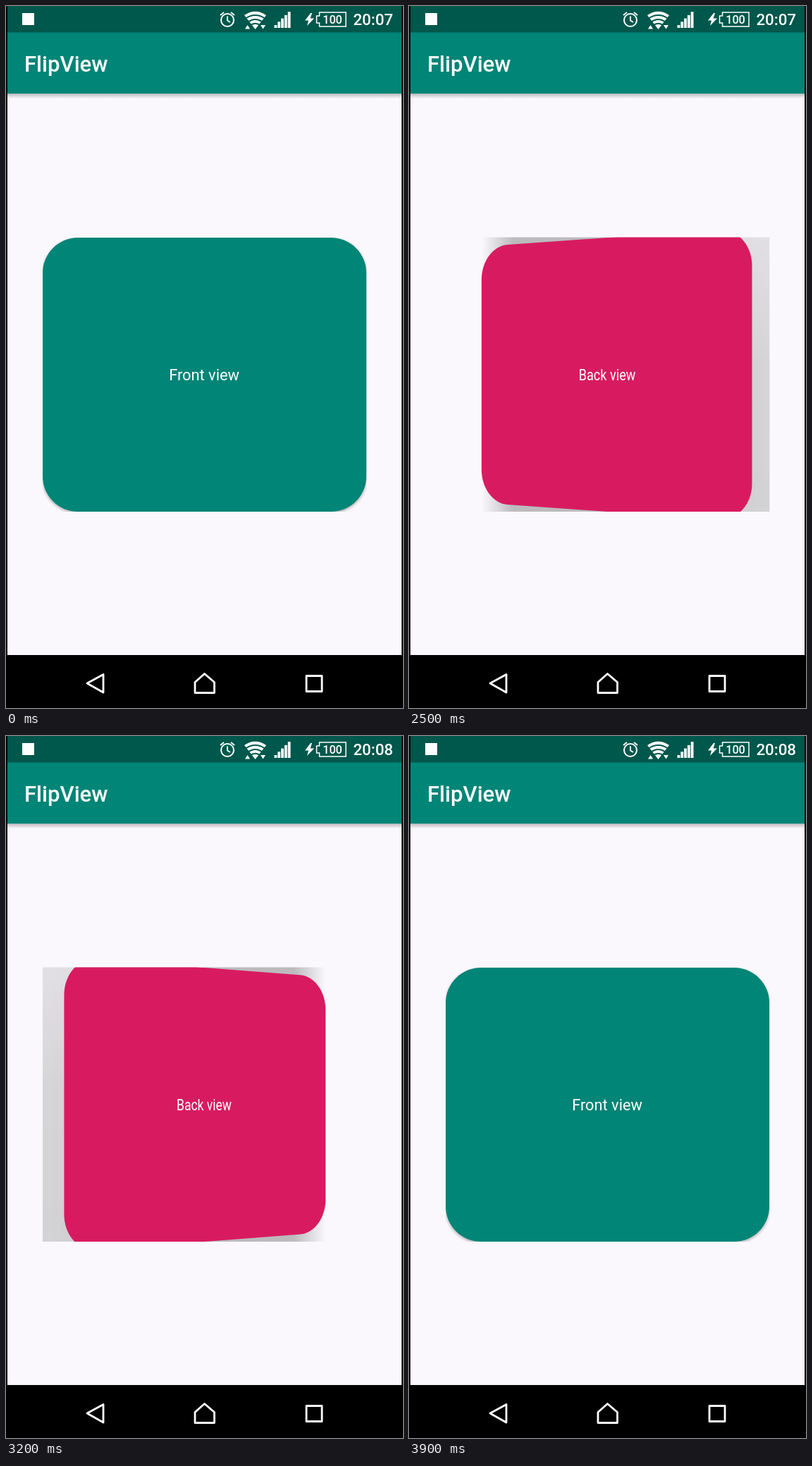
Recreate the animation shown at these times as an HTML page. Size 563x994 px, loop 4000 ms.

```html
<!DOCTYPE html>
<html lang="en">
<head>
<meta charset="utf-8">
<title>FlipView</title>
<style>
  html, body { margin: 0; width: 100%; height: 100%; overflow: hidden; background: #000; }
  svg { display: block; width: 100vw; height: 100vh; }
  text { font-family: Roboto, "Noto Sans", sans-serif; fill: #fff; }
  .medium { font-weight: 500; }
  .line { fill: none; stroke: #fff; }
</style>
</head>
<body>
<svg viewBox="0 0 563 994">
  <defs>
    <clipPath id="cardClip"><rect x="52" y="327.5" width="459.5" height="388.5"/></clipPath>
    <linearGradient id="barShade" x2="0" y2="1">
      <stop offset="0" stop-color="#000" stop-opacity=".26"/>
      <stop offset="1" stop-color="#000" stop-opacity="0"/>
    </linearGradient>
    <linearGradient id="farShade" gradientUnits="userSpaceOnUse" y1="0" y2="0">
      <stop offset="0" stop-opacity="0"/>
      <stop offset="1" stop-opacity=".25"/>
    </linearGradient>
    <linearGradient id="nearShade" gradientUnits="userSpaceOnUse" y1="0" y2="0">
      <stop offset="0" stop-opacity=".16"/>
      <stop offset="1" stop-opacity=".09"/>
    </linearGradient>
    <linearGradient id="fade" x2="0" y2="1">
      <stop offset="0" stop-color="#fff" stop-opacity=".62"/>
      <stop offset=".45" stop-color="#fff" stop-opacity=".95"/>
      <stop offset="1" stop-color="#fff"/>
    </linearGradient>
    <mask id="nearMask" maskUnits="userSpaceOnUse" x="52" y="327" width="460" height="390">
      <rect x="52" y="327" width="460" height="390" fill="url(#fade)"/>
    </mask>
    <filter id="soft" x="-5%" y="-5%" width="110%" height="110%"><feGaussianBlur stdDeviation="2"/></filter>
  </defs>

  <rect width="563" height="994" fill="#000"/>
  <rect x="2" y="37" width="559" height="882" fill="#faf8fc"/>
  <rect x="2" y="124" width="559" height="7" fill="url(#barShade)"/>
  <rect x="2" y="37" width="559" height="87" fill="#008577"/>
  <rect x="2" width="559" height="37.5" fill="#00574b"/>
  <text class="medium" x="26" y="93" font-size="31.1">FlipView</text>

  <!-- status bar -->
  <rect x="23" y="10" width="17" height="17" fill="#fff"/>
  <g class="line" stroke-width="2">
    <circle cx="314" cy="20" r="9"/>
    <path d="M314 14.5V20.5L318 23M304 13L309 9M324 13L319 9"/>
  </g>
  <path d="M353.5 33L338 13Q353.5 2.500 369 13Z" fill="#fff"/>
  <g fill="none" stroke="#00574b" stroke-width="1.8">
    <path d="M339 18Q353.500 8 368 18M343 23Q353.500 15 364 23M346 27.500Q353.500 22 361 27.500"/>
  </g>
  <path d="M339 32.500L342.500 27L346 32.500ZM361 27H368L364.500 32.500Z" fill="#fff"/>
  <g id="signal" fill="#fff"></g>
  <path d="M432 10L424 20.500H429L427 28L437 17.500H431.500L434 10Z" fill="#fff"/>
  <path class="line" stroke-width="1.5" d="M444.500 9H482V29H444.500V24H440.500V14H444.500Z"/>
  <text class="medium" x="463" y="24.500" font-size="16.2" text-anchor="middle">100</text>
  <text class="medium" id="clock" x="549" y="27" font-size="22.3" text-anchor="end"></text>

  <!-- card -->
  <g clip-path="url(#cardClip)">
    <rect id="restShadow" x="52" y="330" width="459" height="388" rx="50" opacity=".3" filter="url(#soft)"/>
    <g id="flipShadow">
      <rect id="farShadow" y="327" height="390" fill="url(#farShade)"/>
      <g mask="url(#nearMask)"><rect id="nearShadow" y="327" height="390" fill="url(#nearShade)"/></g>
    </g>
    <path id="card"/>
    <text id="label" y="530" font-size="21.8" text-anchor="middle"></text>
  </g>

  <!-- navigation bar -->
  <g class="line" stroke-width="2.8" stroke-linejoin="round">
    <path d="M115 959L138 946.500V972Z"/>
    <path d="M268 957.500L281.500 945.500L295.500 957.500V972.500H268Z"/>
    <rect x="426" y="948.500" width="22" height="22"/>
  </g>
</svg>
<script>
const LOOP = 4000, STEP = 100, FLIP = 400;
const FLIP_STARTS = [1769, 2386, 2919, 3450];
const CLOCK_TICK = 3000;
const CX = 281.5, CY = 522, HALF_W = 229.5, HALF_H = 194, RADIUS = 50, CAMERA = 1855;
const SIDES = [
  { text: 'Front view', color: '#008577' },
  { text: 'Back view', color: '#d81b60' }
];

const $ = id => document.getElementById(id);
const set = (id, attrs) => {
  for (const key in attrs) $(id).setAttribute(key, attrs[key]);
};

// Outline of the flat card around its centre
const outline = [];
for (let corner = 0; corner < 4; corner++) {
  const sx = corner === 0 || corner === 3 ? 1 : -1;
  const sy = corner < 2 ? 1 : -1;
  for (let i = 0; i <= 16; i++) {
    const a = (corner + i / 16) * Math.PI / 2;
    outline.push([
      sx * (HALF_W - RADIUS) + RADIUS * Math.cos(a),
      sy * (HALF_H - RADIUS) + RADIUS * Math.sin(a)
    ]);
  }
}

$('signal').innerHTML = [0, 1, 2, 3, 4].map(i =>
  `<rect x="${380.5 + i * 4.8}" y="${27 - i * 4.7}" width="3.8" height="${4 + i * 4.7}"/>`).join('');

function project([x, y], angle) {
  const scale = 1 / (1 - x * Math.sin(angle) / CAMERA);
  return [CX + x * Math.cos(angle) * scale, CY + y * scale];
}

function pose(time) {
  let side = 0, angle = 0;
  for (const start of FLIP_STARTS) {
    const t = (time - start) / FLIP;
    if (t < 0) break;
    if (t >= 0.5) side = 1 - side;
    const turn = t < 1 ? (1 - Math.cos(Math.PI * t)) / 2 : 0;
    angle = Math.PI * (t >= 0.5 && t < 1 ? turn - 1 : turn);
  }
  return { side: SIDES[side], angle };
}

function drawShadow(angle) {
  const resting = angle === 0;
  set('restShadow', { visibility: resting ? 'visible' : 'hidden' });
  set('flipShadow', { visibility: resting ? 'hidden' : 'visible' });
  if (resting) return;
  const dir = Math.sign(angle);
  const far = project([-dir * HALF_W, 0], angle)[0];
  const near = project([dir * HALF_W, 0], angle)[0];
  const span = (a, b) => ({ x: Math.min(a, b), width: Math.abs(a - b) });
  set('farShadow', {
    ...span(far, CX),
    opacity: Math.min(1, Math.abs(Math.sin(angle)) / 0.5)
  });
  set('farShade', { x1: far, x2: far + dir * 45 });
  set('nearShadow', span(CX, CX + dir * 230));
  set('nearShade', { x1: near, x2: near + dir * 230 });
}

function draw(time) {
  const { side, angle } = pose(time);
  const points = outline.map(p => project(p, angle).map(v => v.toFixed(2)).join(' '));
  set('card', { d: `M${points.join('L')}Z`, fill: side.color });
  set('label', { transform: `translate(${CX - 0.5} 0) scale(${Math.cos(angle)} 1)` });
  $('label').textContent = side.text;
  $('clock').textContent = time < CLOCK_TICK ? '20:07' : '20:08';
  drawShadow(angle);
}

const begin = performance.now();
function tick() {
  const time = (performance.now() - begin) % LOOP;
  draw(Math.floor(time / STEP) * STEP);
  requestAnimationFrame(tick);
}
tick();
</script>
</body>
</html>
```
